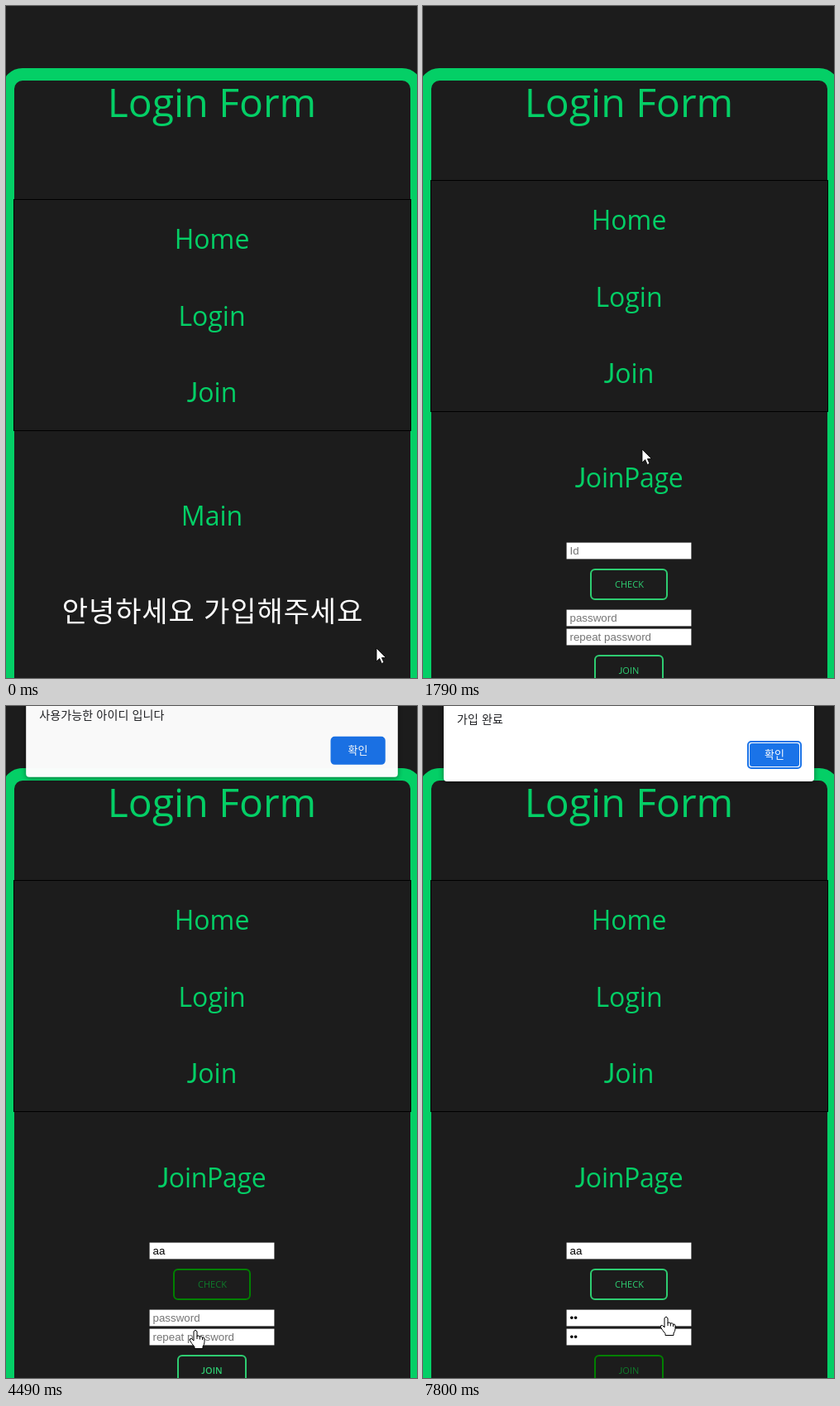
Recreate the animation shown at these times as an HTML page. Size 497 by 811 pixels, loop 8000 ms.

```html
<!DOCTYPE html>
<html lang="ko">
<head>
<meta charset="utf-8">
<style>
  html, body { margin: 0; width: 100%; height: 100%; overflow: hidden; background: #1c1c1c; }
  svg { display: block; width: 497px; height: 811px; }
  text { font-family: "Open Sans", "Noto Sans", sans-serif; fill: #04cf66; white-space: pre; }
  .mid { text-anchor: middle; font-size: 32px; }
  .j { font-family: Lato, sans-serif; }
  .ko { font-family: "Noto Sans CJK KR", "Noto Sans CJK", sans-serif; }
  .field text { font: 13.33px "Liberation Sans", Arial, sans-serif; }
  .btn rect { fill: none; stroke: #2ecc71; stroke-width: 2; }
  .btn text { fill: #2ecc71; font-size: 11px; text-anchor: middle; }
  .btn.hot rect { stroke: #008000; }
  .btn.hot text { fill: #0e7a2a; }
  #dialog { filter: drop-shadow(0 1px 3px rgba(0, 0, 0, .45)); }
  #dialog text { font-size: 14px; letter-spacing: .1px; fill: #202124; }
  #dialog .ok { font-size: 13px; fill: #fff; text-anchor: middle; }
</style>
</head>
<body>
<svg viewBox="0 0 497 811">
  <rect width="497" height="811" fill="#1c1c1c"/>
  <rect x="2.5" y="82.5" width="494" height="900" rx="17.5" fill="none" stroke="#04cf66" stroke-width="15"/>
  <text class="mid" x="249" y="134" style="font-size:48px">Login Form</text>

  <g id="nav">
    <rect x="9.5" y="233.5" width="480" height="279" fill="#1c1c1c" stroke="#000"/>
    <rect id="hover" x="10" width="479" height="74" fill="#bfbfbf"/>
    <text class="mid" x="249" y="293">Home</text>
    <text class="mid" x="249" y="386">Login</text>
    <text class="mid" x="249" y="478"><tspan class="j">J</tspan>oin</text>
  </g>

  <g id="main">
    <text class="mid" x="249" y="627">Main</text>
    <text class="mid ko" x="250" y="743" style="font-size:34px;letter-spacing:.9px;fill:#fff">안녕하세요 가입해주세요</text>
  </g>

  <g id="join">
    <text class="mid" x="249" y="581" letter-spacing="-.3"><tspan class="j">J</tspan>oinPage</text>
    <g id="fields"></g>
    <g class="btn" id="checkBtn">
      <rect x="203" y="680" width="92" height="36" rx="5"/>
      <text x="249.5" y="702">CHECK</text>
    </g>
    <g class="btn" id="joinBtn">
      <rect x="208" y="784" width="82" height="36" rx="5"/>
      <text x="249" y="806"><tspan class="j">J</tspan>OIN</text>
    </g>
  </g>

  <g id="dialog">
    <rect x="25" y="-60" width="448" height="151" rx="4" fill="#fff"/>
    <text class="ko" id="message" x="41" y="21"></text>
    <rect x="393" y="43" width="64" height="32" rx="4" stroke="#1a73e8" stroke-width="2" id="gap"/>
    <rect x="395" y="45" width="60" height="28" rx="3" fill="#1a73e8"/>
    <text class="ko ok" x="425" y="63">확인</text>
  </g>

  <g id="cursor" stroke="#000" stroke-linejoin="round" fill="#fff">
    <path id="arrow" stroke-width=".8" d="M0 0V16L3.700 12.500 6.300 18.500 9 17.300 6.400 11.500H11.500Z"/>
    <g id="hand">
      <path d="M-2 2Q0-1.500 2 2V7.500Q4 6 5.300 8Q7.300 7 8.500 9Q11 8.500 11 11V14.500Q11 17.500 9 20V22.500H-1V20.500Q-4.500 16.500-6.700 12.500Q-7 10-4.500 10.500L-2 13Z"/>
      <path d="M2 7V11M5.300 8V11.500M8.500 9V12" fill="none"/>
    </g>
    <path id="beam" fill="none" stroke="#222" d="M-3.500-7.500H-1Q0-7.500 0-6.500Q0-7.500 1-7.500H3.500M0-6.500V7M-3.500 8.500H-1Q0 8.500 0 7Q0 8.500 1 8.500H3.500"/>
  </g>
</svg>
<script>
const LOOP = 8000, PAGE_CHANGE = 1180;
const $ = id => document.getElementById(id);
const clamp = v => Math.min(1, Math.max(0, v));
const show = (el, on) => { el.style.display = on ? '' : 'none'; };

// top, placeholder, typed character and its advance, key times, focus span
const fields = [
  { y: 647, hint: 'Id', char: 'a', step: 7.41, keys: [2800, 2940], focus: [2330, 3480] },
  { y: 728, hint: 'password', char: '•', step: 4.67, keys: [5900, 5970], focus: [5450, 6560] },
  { y: 751, hint: 'repeat password', char: '•', step: 4.67, keys: [6740, 6850], focus: [6560, 7460] }
];
$('fields').innerHTML = fields.map(({ y }) => `
  <g class="field">
    <rect x="173.5" y="${y + .5}" width="151" height="20" rx="1" fill="#fff" stroke="#767676"/>
    <g>
      <rect x="172.5" y="${y - .5}" width="153" height="22" rx="3" fill="none" stroke="#fff"/>
      <rect x="174" y="${y + 1}" width="150" height="19" rx="1.500" fill="none" stroke="#101010" stroke-width="2"/>
      <rect y="${y + 3}" width="1" height="15"/>
    </g>
    <text x="177.500" y="${y + 15}"></text>
  </g>`).join('');
fields.forEach((f, i) => {
  const el = $('fields').children[i];
  f.ring = el.children[1];
  f.caret = f.ring.lastElementChild;
  f.text = el.lastElementChild;
});

// time, x, y, pointer kind until the next stop
const stops = [
  [0, 448, 775, 'arrow'], [70, 448, 775, 'arrow'], [380, 350, 502, 'hand'], [520, 300, 395, 'hand'],
  [840, 259, 468, 'hand'], [1640, 259, 468, 'hand'], [1720, 262, 485, 'arrow'], [1790, 265, 535, 'arrow'],
  [2000, 262, 600, 'arrow'], [2250, 255, 655, 'beam'], [2400, 255, 662, 'beam'], [2570, 255, 662, ''],
  [2990, 255, 662, 'beam'], [3080, 255, 672, 'arrow'], [3140, 255, 682, 'hand'], [3210, 255, 694, 'hand'],
  [4350, 255, 694, 'hand'], [4490, 229, 753, 'hand'], [4630, 226, 762, 'hand'], [4820, 226, 762, 'arrow'],
  [5000, 228, 780, 'arrow'], [5200, 215, 768, 'beam'], [5450, 209, 740, 'beam'], [5610, 209, 740, ''],
  [6210, 209, 740, 'beam'], [6450, 225, 768, 'beam'], [6600, 233, 766, 'beam'], [6880, 233, 766, 'arrow'],
  [6990, 240, 777, 'arrow'], [7060, 245, 784, 'hand'], [7260, 250, 790, 'hand'], [7460, 250, 790, 'hand'],
  [7660, 294, 737, 'hand'], [LOOP, 294, 737, 'hand']
];

function pointer(t) {
  const i = stops.findIndex(s => s[0] > t) - 1;
  const [t0, x0, y0, kind] = stops[i], [t1, x1, y1] = stops[i + 1];
  const p = (t - t0) / (t1 - t0);
  return { x: x0 + (x1 - x0) * p, y: y0 + (y1 - y0) * p, kind };
}

function drawDialog(t) {
  const second = t > 7000, closing = !second && t >= 4420;
  const opened = clamp((t - (second ? 7530 : 3580)) / 260);
  const closed = closing ? clamp((t - 4420) / 180) : 0;
  const lift = 19 * (1 - opened) ** 2 + 33 * closed ** 2;
  const alpha = opened * (1 - closed ** 4);
  show($('dialog'), alpha > 0);
  $('dialog').style.opacity = alpha;
  $('dialog').setAttribute('transform',
    `translate(249 ${-lift}) scale(${1 + lift * .0007} 1) translate(-249 0)`);
  $('message').textContent = second ? '가입 완료' : '사용가능한 아이디 입니다';
  $('gap').setAttribute('fill', closing ? '#1a73e8' : '#fff');
}

function draw(t) {
  const joined = t >= PAGE_CHANGE, shift = joined ? -23 : 0;
  const { x, y, kind } = pointer(t);

  show($('main'), !joined);
  show($('join'), joined);
  $('nav').setAttribute('transform', `translate(0 ${shift})`);
  const row = [243, 336, 428].find(top => y - shift >= top && y - shift <= top + 74);
  show($('hover'), row);
  $('hover').setAttribute('y', row || 0);

  for (const f of fields) {
    const n = f.keys.filter(k => t >= k).length;
    f.text.textContent = n ? f.char.repeat(n) : f.hint;
    f.text.style.fill = n ? '#000' : '#757575';
    show(f.ring, t >= f.focus[0] && t < f.focus[1]);
    f.caret.setAttribute('x', Math.round(177 + n * f.step));
  }
  $('checkBtn').classList.toggle('hot', t >= 3140 && t < 4820);
  $('joinBtn').classList.toggle('hot', t >= 7060);
  $('joinBtn').style.fontWeight = t >= 3480 && t < 6210 ? 600 : 400;

  drawDialog(t);
  for (const k of ['arrow', 'hand', 'beam']) show($(k), k === kind);
  $('cursor').setAttribute('transform', `translate(${Math.round(x)} ${Math.round(y)})`);
}

const start = performance.now();
function tick() {
  draw((performance.now() - start) % LOOP);
  requestAnimationFrame(tick);
}
tick();
</script>
</body>
</html>
```
